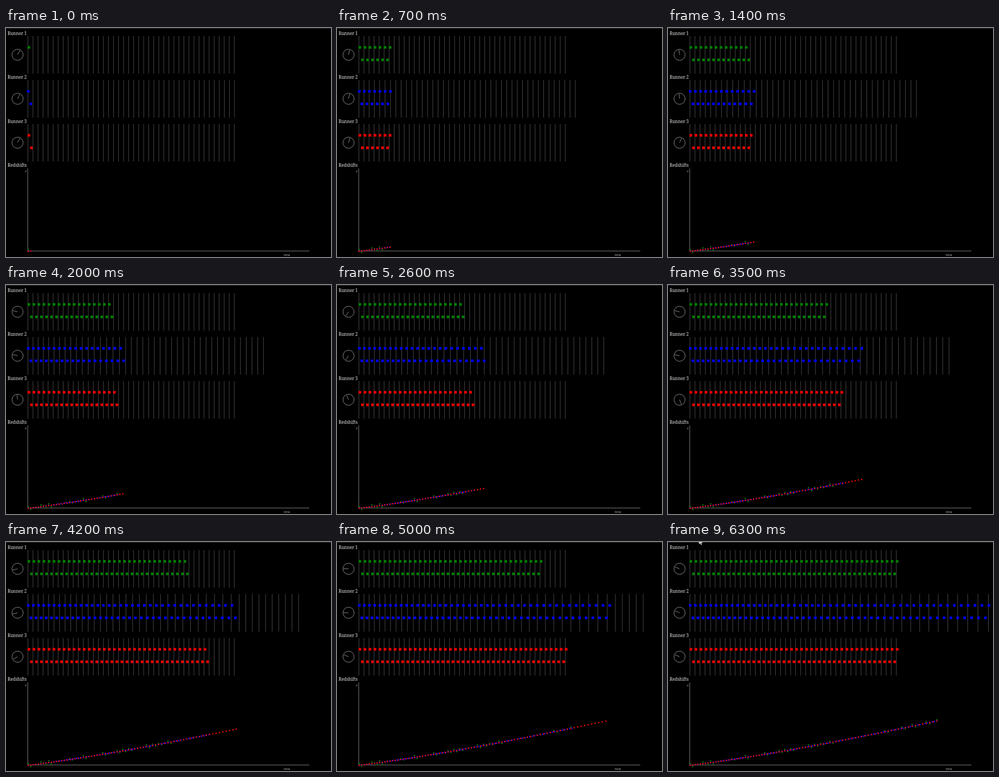
Write an HTML page with a canvas that moves like this. It is 600 px wide and 424 px high and loops after 6.7 s.

```html
<!DOCTYPE html>
<html>
<head>
<meta charset="utf-8">
<style>
html, body { margin: 0; width: 100%; height: 100%; overflow: hidden; background: #000; }
canvas { display: block; }
</style>
</head>
<body>
<canvas id="stage" width="600" height="424"></canvas>
<script>
const ctx = document.getElementById('stage').getContext('2d');
const LOOP = 6700, STEP = 100, FINISH = 58.2;
const TILES = 41, TILE = 9.29, LAST = 2 * TILES + 1;
const GREEN = '#008000', BLUE = '#0000ff', RED = '#ff0000';
const LABEL = '8px "Noto Serif", serif';

// A slowing footfall counter and its inverse.
function clock(first, rate, drag) {
  return {
    at: n => first + rate * n - drag * n * n,
    when: v => (rate - Math.sqrt(rate * rate - 4 * drag * (v - first))) / (2 * drag)
  };
}

const slow = clock(1.95, 1.721, 0.00562);
const fast = clock(2.02, 1.715, 0.0008);
const fastEnd = fast.when(LAST);
const slowDeg = n => 28 + n * (49.3 - 0.025 * n);
const fastDeg = n => 28 + n * (48.5 + 0.19 * n);

const spacing = n => 9.3 + n * (0.0622 + 0.000155 * n);
const graphX = j => 41 + 4.65 * j * (1 + j * (0.00188 + 0.000006 * j));
const graphY = j => 413.5 - j * (0.59 + 0.005 * j);

function random(seed) {
  const v = Math.sin(seed * 127.1 + 3.7) * 43758.5453;
  return v - Math.floor(v);
}

// A stray reading goes up, the next one swings back down.
const bump = j => random(j) < 0.22 ? 1.5 + 2 * random(j + 100) : 0;
const scatter = j => 0.8 * bump(j - 1) - bump(j);

function rect(x, y, w, h, color) {
  ctx.fillStyle = color;
  ctx.fillRect(x, y, w, h);
}

function block(x, y, size, color) {
  rect(x - size / 2, y - size / 2, size, size, color);
}

function text(str, x, y, font, color) {
  ctx.font = font;
  ctx.fillStyle = color;
  ctx.fillText(str, x, y);
}

function dial(y, deg) {
  const a = deg * Math.PI / 180, x = 21.3;
  ctx.strokeStyle = '#aaa';
  ctx.lineWidth = 0.8;
  ctx.beginPath();
  ctx.arc(x, y, 10.3, 0, Math.PI * 2);
  ctx.moveTo(x, y);
  ctx.lineTo(x + 9.2 * Math.sin(a), y - 9.2 * Math.cos(a));
  ctx.stroke();
}

function track(row, deg, count, lineX, footX, color) {
  const top = 15 + 81.4 * row;
  text('Runner ' + (row + 1), 3, Math.round(top - 2.2), LABEL, '#e6e6e6');
  dial(top + 34.6, deg);
  for (let k = 0; k <= TILES; k++) rect(lineX(k), top, 1, 69.5, '#474747');
  for (let j = 0; j < count; j++) block(footX(j), top + (j % 2 ? 44 : 20.9), 4.8, color);
}

// Unstretched footfalls that have gone by when the second runner takes step j.
const covered = j => slow.at(fast.when(j + 1)) - 1;

function graph(greens, blues, reds) {
  text('Redshifts', 3, 257, LABEL, '#e6e6e6');
  text('z', 35, 267, 'italic 6px "Noto Serif", serif', '#bbb');
  text('time', 513, 422, '5px "DejaVu Sans", sans-serif', '#ccc');
  rect(39.6, 260, 1, 153.5, '#808080');
  rect(39.6, 412.4, 520.4, 1, '#808080');
  const dot = (j, dy, color) => block(graphX(j), graphY(j) + dy, 2.3, color);
  for (let j = 0; j < greens; j++) dot(j, scatter(j), GREEN);
  for (let j = 0; j < blues; j++) dot(covered(j), 0, BLUE);
  for (let j = 0; j < reds; j++) dot(j, 0, RED);
}

function pointer(p) {
  const x = 232 - 175 * p, y = 186 - 192 * p;
  const shape = [[0, 0], [0, 10], [2.3, 8], [4, 11.5], [5.6, 10.8], [4.2, 7.4], [7.5, 7.2]];
  ctx.beginPath();
  for (const [dx, dy] of shape) ctx.lineTo(x + dx, y + dy);
  ctx.closePath();
  ctx.fillStyle = '#ddd';
  ctx.fill();
}

function draw(step) {
  const n = Math.min(step, FINISH);
  const greens = Math.floor(slow.at(n));
  const blues = Math.floor(fast.at(n));
  const reds = Math.min(blues, LAST);

  const evenLine = k => 40 + TILE * k;
  const evenFoot = j => 42.2 + TILE / 2 * j;
  // Grid lines stretch until the runner has passed them.
  const stretchedLine = k => {
    const passed = Math.max(0, slow.when(2 * k + 1));
    return 40 + k * spacing(Math.min(n, passed));
  };
  const stretchedFoot = j => 41.5 + covered(j) / 2 * spacing(fast.when(j + 1));

  rect(0, 0, 600, 424, '#000');
  rect(0, 0, 600, 1, '#333');
  track(0, slowDeg(n), greens, evenLine, evenFoot, GREEN);
  track(1, slowDeg(n), blues, stretchedLine, stretchedFoot, BLUE);
  track(2, fastDeg(Math.min(n, fastEnd)), reds, evenLine, evenFoot, RED);
  graph(greens, blues, reds);
  if (step >= 61) pointer(Math.min(1, (step - 61) / 2));
}

const start = performance.now();
function tick() {
  const t = (performance.now() - start) % LOOP;
  draw(Math.floor(t / STEP));
  requestAnimationFrame(tick);
}
tick();
</script>
</body>
</html>
```
